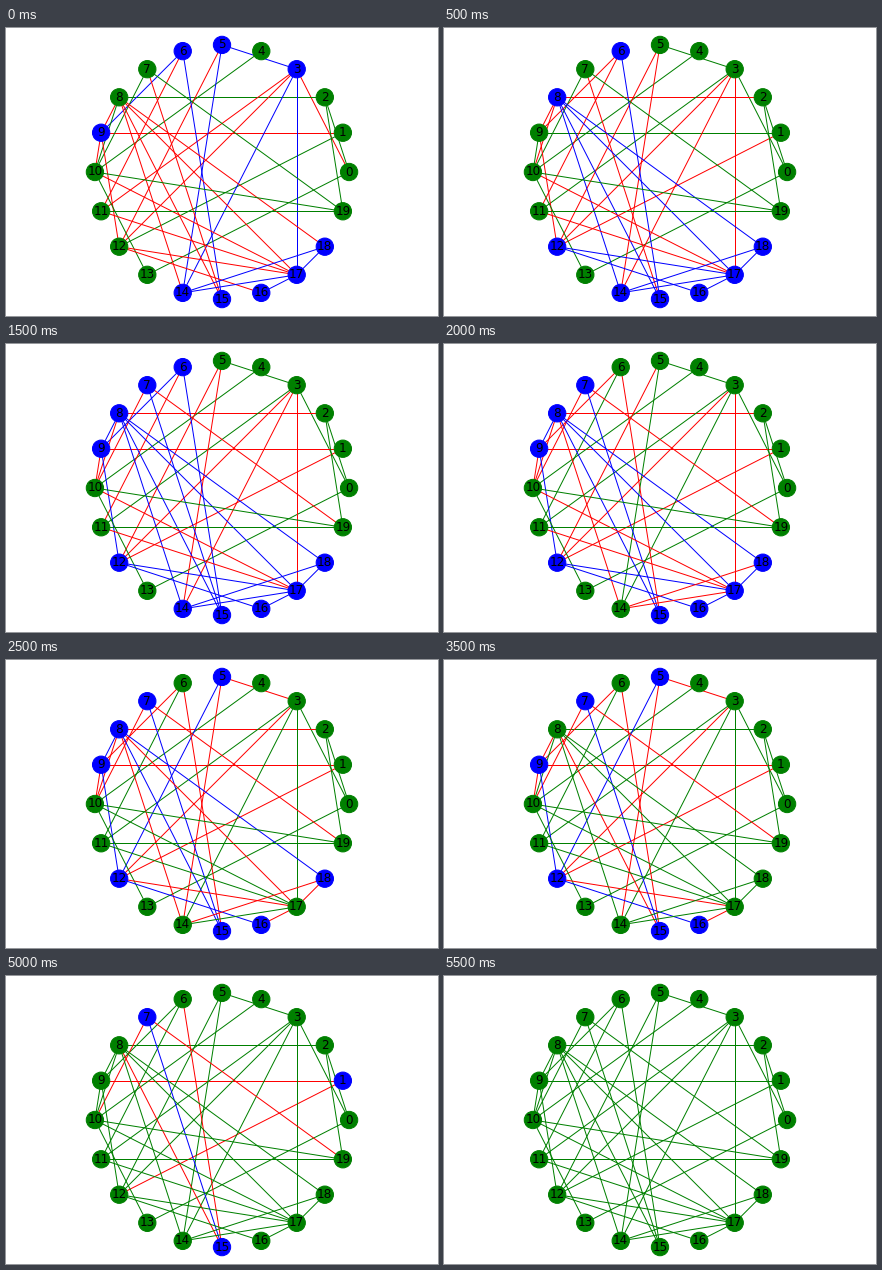
Recreate the animation shown at these times as a matplotlib script. Size 432x288 px, loop 6000 ms.

```python
import numpy as np
import matplotlib.pyplot as plt
from matplotlib.animation import FuncAnimation
from matplotlib.collections import LineCollection

WIDTH, HEIGHT, DPI = 432, 288, 72
COUNT, STEPS = 20, 12
NODE_SIZE = 300

# The graph: each node with its higher-numbered neighbours.
NEIGHBOURS = {
    0: [2, 3, 13], 1: [9, 12], 2: [8, 19], 3: [5, 11, 12, 14, 17],
    4: [10], 5: [12, 14], 6: [9, 11, 15], 7: [10, 15, 19],
    8: [9, 10, 14, 15, 17, 18], 9: [10, 12], 10: [13, 17, 19],
    11: [17, 19], 12: [16, 17], 14: [17, 18], 16: [17], 17: [18],
}
EDGES = [(a, b) for a, others in NEIGHBOURS.items() for b in others]

# First and last step at which a node holds the blue opinion.
BLUE_SPAN = {
    1: (8, 10), 5: (5, 7), 6: (0, 3), 7: (2, 10), 8: (1, 6), 9: (3, 7),
    12: (1, 9), 14: (0, 3), 15: (0, 10), 16: (0, 8), 17: (0, 4), 18: (0, 5),
}
BLUE_ONLY_AT_START = {3, 5, 9}


def opinion(node, step):
    first, last = BLUE_SPAN.get(node, (STEPS, STEPS))
    blue = first <= step <= last or (step == 0 and node in BLUE_ONLY_AT_START)
    return "blue" if blue else "green"


angles = 2 * np.pi * np.arange(COUNT) / COUNT
points = np.column_stack([np.cos(angles), np.sin(angles)])

fig = plt.figure(figsize=(WIDTH / DPI, HEIGHT / DPI), dpi=DPI, facecolor="white")
ax = fig.add_axes([0, 0, 1, 1])
# Unit circle plus one node radius, with a 10 % margin.
reach = 1.1 * (1 + np.sqrt(NODE_SIZE) / 2 / HEIGHT)
ax.set_xlim(-reach * WIDTH / HEIGHT, reach * WIDTH / HEIGHT)
ax.set_ylim(-reach, reach)
ax.axis("off")

lines = LineCollection([points[[a, b]] for a, b in EDGES], linewidths=1, zorder=1)
ax.add_collection(lines, autolim=False)
nodes = ax.scatter(*points.T, s=NODE_SIZE, linewidths=1, zorder=2)
for node, (x, y) in enumerate(points):
    ax.text(x, y, str(node), fontsize=12, family="DejaVu Sans",
            ha="center", va="center", zorder=3)


def update(step):
    colors = [opinion(node, step) for node in range(COUNT)]
    nodes.set_facecolor(colors)
    nodes.set_edgecolor(colors)
    lines.set_color([colors[a] if colors[a] == colors[b] else "red"
                     for a, b in EDGES])
    return lines, nodes


anim = FuncAnimation(fig, update, frames=STEPS, interval=500,
                     repeat=True, repeat_delay=0)
plt.show()
```
